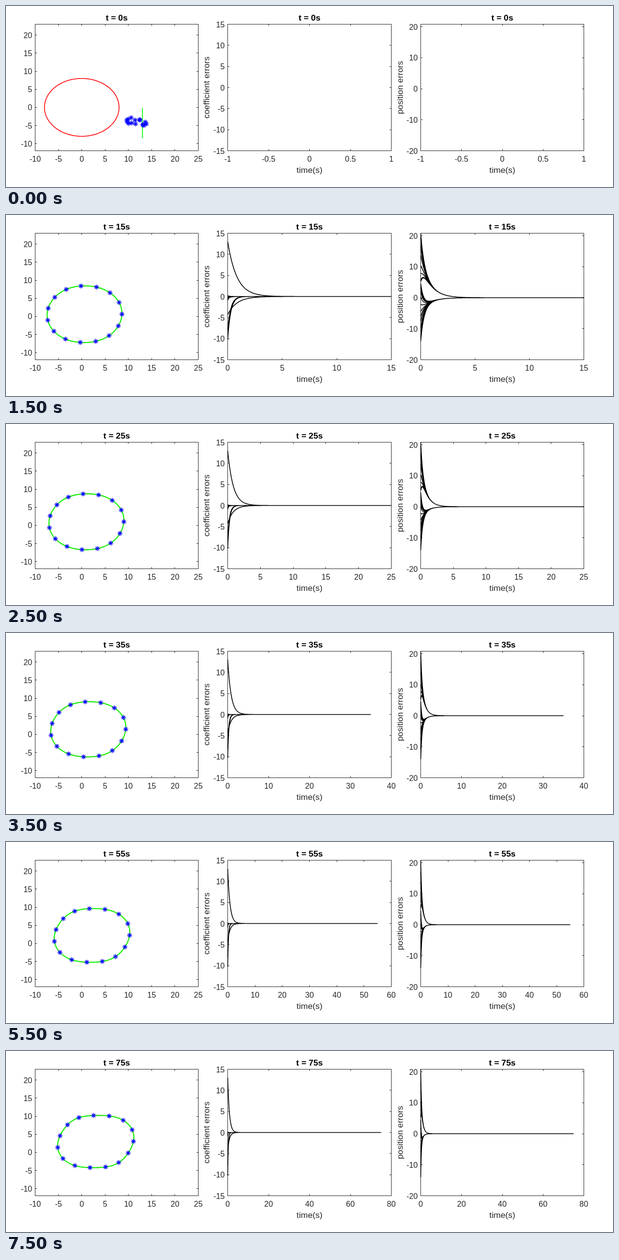
Write an HTML page with a canvas that moves like this. It is 1239 by 372 pixels and loops after 8000 ms.

```html
<!DOCTYPE html>
<html lang="en">
<head>
<meta charset="utf-8">
<title>Curve tracking</title>
<style>
html, body { margin: 0; width: 1239px; height: 372px; overflow: hidden; background: #fff; }
canvas { display: block; }
</style>
</head>
<body>
<canvas id="stage" width="1239" height="372"></canvas>
<script>
const ctx = document.getElementById('stage').getContext('2d');
const FONT = '"Liberation Sans", Arial, sans-serif';
const INK = '#262626';
const TOP = 37.5, BOTTOM = 297.5;
const STEP = 500, COUNT = 16, STEP_SECONDS = 5;
const MARKERS = 15;
const SLOW = 1.2, FAST = 3.5;
const CENTER = [13, -4.3];

// marker positions before the controller starts
const CLUSTER = [
  [246, 234], [249, 232], [255, 229], [256, 240], [250, 241],
  [247, 238], [263, 234], [264, 242], [272, 233], [273, 234],
  [279, 244], [281, 245], [284, 238], [286, 242], [279, 243]
];
// [slow part, fast part decay rate, start value]
const COEFFS = [
  [13, FAST, 13], [-4.3, FAST, -4.3], [0, FAST, -10.2], [0, FAST, -8],
  [0, 8, -0.9], [0, 4, -0.45], [0, 6, 0.2], [0, 5, -0.2]
];
const X_STARTS = [20.8, 19.5, 19, 17, 16.4, 13.8, 10.3, 7.7, 5.6, 5.2];
const Y_STARTS = [4.6, 4, 3.2, 2, 0.3, -2.1, -4.4, -6, -7.6, -9.8, -10.7, -13, -14];
const POSITIONS = [
  ...X_STARTS.map(s => [CENTER[0], FAST, s]),
  ...Y_STARTS.map(s => [CENTER[1], FAST, s])
];

function makeAxes(left, right, xMin, xMax, yMin, yMax) {
  return {
    left, right,
    x: v => left + (v - xMin) / (xMax - xMin) * (right - left),
    y: v => BOTTOM - (v - yMin) / (yMax - yMin) * (BOTTOM - TOP)
  };
}

function line(x1, y1, x2, y2) {
  ctx.beginPath();
  ctx.moveTo(x1, y1);
  ctx.lineTo(x2, y2);
  ctx.stroke();
}

function text(str, x, y, size, align, color = INK, weight = '') {
  ctx.font = `${weight} ${size}px ${FONT}`;
  ctx.textAlign = align;
  ctx.fillStyle = color;
  ctx.fillText(str, x, y);
}

function range(from, to, step) {
  const out = [];
  for (let v = from; v <= to + 1e-9; v += step) out.push(v);
  return out;
}

const crisp = v => Math.floor(v) + 0.5;

function drawAxes(ax, xTicks, yTicks, seconds) {
  ctx.strokeStyle = INK;
  ctx.lineWidth = 1;
  ctx.strokeRect(ax.left, TOP, ax.right - ax.left, BOTTOM - TOP);
  for (const v of xTicks) {
    const x = crisp(ax.x(v));
    line(x, BOTTOM, x, BOTTOM - 3.5);
    line(x, TOP, x, TOP + 3.5);
    text(String(v), ax.x(v), 320, 16, 'center');
  }
  for (const v of yTicks) {
    const y = crisp(ax.y(v));
    line(ax.left, y, ax.left + 3.5, y);
    line(ax.right, y, ax.right - 3.5, y);
    text(String(v), ax.left - 6, ax.y(v) + 6, 16, 'right');
  }
  text(`t = ${seconds}s`, (ax.left + ax.right) / 2, 30, 17.3, 'center', '#000', 'bold');
}

function axisLabels(ax, name, x) {
  text('time(s)', (ax.left + ax.right) / 2, 343, 17.3, 'center');
  ctx.save();
  ctx.translate(x, (TOP + BOTTOM) / 2);
  ctx.rotate(-Math.PI / 2);
  text(name, 0, 0, 17.3, 'center');
  ctx.restore();
}

// circle of radius 8 that drifts and bends steadily
function shape(a, t) {
  const s1 = Math.sin(a), s3 = Math.sin(3 * a), s5 = Math.sin(5 * a), c1 = Math.cos(a);
  const k = t / 75;
  return [
    8 * c1 + k * (3 + 0.53 * s1 + 0.085 * c1 + 0.19 * s3 + 0.03 * s5),
    8 * s1 + k * (3 - 0.44 * s1 + 0.04 * c1 + 0.234 * s3 - 0.1 * s5)
  ];
}

function drawShape(ax, t, color, width, shift = 0) {
  ctx.beginPath();
  for (let i = 0; i <= 240; i++) {
    const [x, y] = shape(i / 240 * 2 * Math.PI, t);
    ctx.lineTo(ax.x(x + CENTER[0] * shift), ax.y(y + CENTER[1] * shift));
  }
  ctx.strokeStyle = color;
  ctx.lineWidth = width;
  ctx.stroke();
}

function star(x, y) {
  ctx.strokeStyle = '#00f';
  ctx.lineWidth = 1.5;
  for (let i = 0; i < 4; i++) {
    const dx = 5 * Math.cos(i * Math.PI / 4), dy = 5 * Math.sin(i * Math.PI / 4);
    line(x - dx, y - dy, x + dx, y + dy);
  }
}

function drawTracking(t) {
  const ax = makeAxes(59.5, 392.5, -10, 25, -12, 23);
  drawAxes(ax, range(-10, 25, 5), range(-10, 20, 5), t);
  drawShape(ax, t, '#f00', 1.6);
  if (t === 0) {
    ctx.strokeStyle = '#0f0';
    ctx.lineWidth = 1.7;
    line(278.5, 210, 278.5, 272);
    CLUSTER.forEach(([x, y]) => star(x + 0.5, y + 0.5));
    return;
  }
  const shift = Math.exp(-SLOW * t);
  drawShape(ax, t, '#0f0', 2, shift);
  for (let k = 0; k < MARKERS; k++) {
    const [x, y] = shape(k * 2 * Math.PI / MARKERS, t);
    star(ax.x(x + CENTER[0] * shift), ax.y(y + CENTER[1] * shift));
  }
}

function timeScale(t) {
  if (t === 0) return { min: -1, max: 1, step: 0.5 };
  const max = t <= 30 ? t : t <= 60 ? Math.ceil(t / 10) * 10 : 80;
  const step = max <= 5 ? 1 : max <= 10 ? 2 : max <= 30 ? 5 : max <= 60 ? 10 : 20;
  return { min: 0, max, step };
}

// one path for all curves, so that overlapping edges do not thicken
function drawErrors(ax, curves, t) {
  if (t === 0) return;
  ctx.strokeStyle = '#000';
  ctx.lineWidth = 1.6;
  ctx.lineJoin = 'round';
  ctx.beginPath();
  for (const [slow, rate, start] of curves) {
    ctx.moveTo(ax.x(0), ax.y(start));
    for (let i = 1; i <= 200; i++) {
      const s = Math.min(t, 10) * (i / 200) ** 2;
      const v = slow * Math.exp(-SLOW * s) + (start - slow) * Math.exp(-rate * s);
      ctx.lineTo(ax.x(s), ax.y(v));
    }
    ctx.lineTo(ax.x(t), ax.y(0));
  }
  ctx.stroke();
}

function drawPlot(left, right, yMin, yMax, yStep, name, labelX, curves, t) {
  const { min, max, step } = timeScale(t);
  const ax = makeAxes(left, right, min, max, yMin, yMax);
  drawAxes(ax, range(min, max, step), range(yMin, yMax, yStep), t);
  axisLabels(ax, name, labelX);
  drawErrors(ax, curves, t);
}

function draw(t) {
  ctx.fillStyle = '#fff';
  ctx.fillRect(0, 0, 1239, 372);
  drawTracking(t);
  drawPlot(452.5, 786.5, -15, 15, 5, 'coefficient errors', 415, COEFFS, t);
  drawPlot(846.5, 1179.5, -20, 20.8, 10, 'position errors', 809.5, POSITIONS, t);
}

let shown = -1;
const began = performance.now();
function tick() {
  const elapsed = Math.max(0, performance.now() - began);
  const index = Math.floor(elapsed / STEP) % COUNT;
  if (index !== shown) {
    shown = index;
    draw(index * STEP_SECONDS);
  }
  requestAnimationFrame(tick);
}
tick();
</script>
</body>
</html>
```
